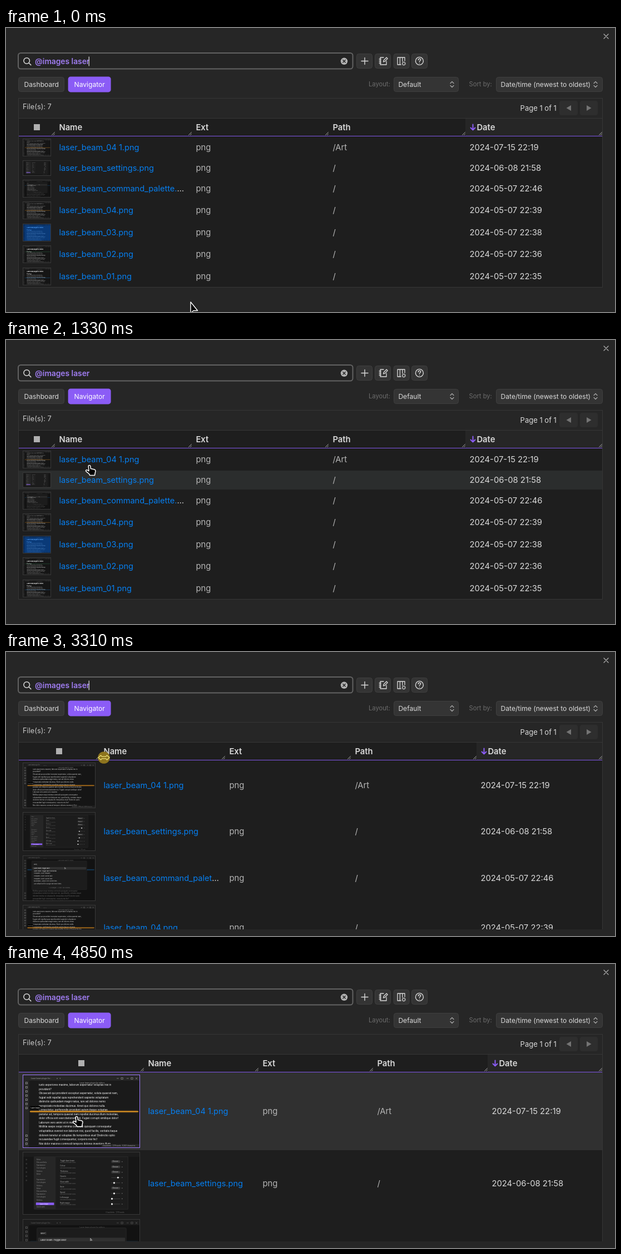
These frames come from a looping animation (1095x511 px, 5190 ms). An HTML page:

```html
<!DOCTYPE html>
<html lang="en">
<head>
<meta charset="utf-8">
<title>File navigator</title>
<style>
  html, body { margin: 0; width: 100%; height: 100%; overflow: hidden; background: #262626; }
  body { position: relative; font-family: Inter, sans-serif; }
  #chrome, #pointer { position: absolute; left: 0; top: 0; width: 1095px; height: 511px; }
  svg text { white-space: pre; }
  #clip { position: absolute; left: 22px; top: 126px; width: 1051px; height: 373px; overflow: hidden; }
  #panel { box-sizing: border-box; width: 1051px; border: 1px solid #363636; background: #1e1e1e; }
  .bar { height: 35px; background: #262626; border-bottom: 1px solid #363636; }
  .line { display: grid; grid-template-columns: var(--w) repeat(4, minmax(0, 1fr)); align-items: center;
          font-size: 14.8px; line-height: 20px; }
  .head { box-sizing: border-box; height: 32.2px; border-bottom: 1px solid #7f56e8; color: #dadada; font-weight: 600; }
  .head > div { position: relative; height: 31px; line-height: 33px; padding-left: 7.4px; }
  .head > div:last-child { background: #262626; }
  .head i { position: absolute; left: calc(50% - 5.5px); top: 10px; width: 11px; height: 11px; background: #b0b0b0; }
  .head .grip { position: absolute; right: 0; bottom: 1px; width: 6px; height: 6px; }
  .head .sort { vertical-align: -1px; margin-left: 1px; }
  .row { padding: 3.75px 0; }
  .row.hover { background: #2b2d2d; }
  .row.peek { background: #303030; }
  .row > div { padding: 0 7.4px; overflow: hidden; white-space: nowrap; text-overflow: ellipsis; color: #b5b5b5; }
  .row > div:last-child { color: #dadada; }
  .row .name { color: #dadada; font-size: 14.55px; }
  .name span { color: #067ff0; }
  .thumb { display: block; box-sizing: border-box; margin-left: 7px; width: calc(var(--w) - 14px);
           border: 1px solid #383838; overflow: hidden; }
  .peek .thumb { border-color: #7d60c8; filter: brightness(1.25); }
</style>
</head>
<body>
<div id="clip"><div id="panel"></div></div>
<svg id="chrome" viewBox="0 0 1095 511" font-family="Inter, sans-serif"></svg>
<svg id="pointer" viewBox="0 0 1095 511">
  <g id="arrow"><path d="M1 0V20L6 15.5H13.5Z" fill="#000" stroke="#fff" stroke-width="1.4" stroke-linejoin="round"/></g>
  <g id="hand"><path d="M-1.8 1.8Q-1.8 .4 0 .4Q1.6 .4 1.8 2L2.4 6.6L9 8Q11 8.6 11 10.6L10 15.5L9.4 18.6H.6L-.4 16L-6 11.4Q-7.2 9.8-5.6 8.9Q-4.2 8.3-1 10.8Z" fill="#000" stroke="#fff" stroke-width="1.5" stroke-linejoin="round"/></g>
  <g id="resize">
    <circle id="disc" r="10.8"/>
    <path id="bone" d="M-10 0L-5.5-4L-3.6-1.8H3.6L5.5-4L10 0L5.5 4L3.6 1.8H-3.6L-5.5 4Z" stroke-width="1.3" stroke-linejoin="round"/>
  </g>
</svg>
<script>
const $ = id => document.getElementById(id);
const rect = (x, y, w, h, fill, extra = '') => `<rect x="${x}" y="${y}" width="${w}" height="${h}" fill="${fill}" ${extra}/>`;
const text = (x, y, size, fill, str, extra = '') => `<text x="${x}" y="${y}" font-size="${size}" fill="${fill}" ${extra}>${str}</text>`;
const path = (d, stroke, width = 1.4) => `<path d="${d}" fill="none" stroke="${stroke}" stroke-width="${width}" stroke-linecap="round" stroke-linejoin="round"/>`;
const range = (n, f) => Array.from({ length: n }, (_, i) => f(i)).join('');

// Toolbar, search box and selects
const button = (x, y, w, h, fill = '#343434') => rect(x + .5, y + .5, w - 1, h - 1, fill, 'rx="4" stroke="#3f3f3f"');
const chevrons = (x, y) => path(`M${x - 3} ${y - 2}l3-3l3 3M${x - 3} ${y + 2}l3 3l3-3`, '#aaa', 1.2);
const ink = '#dadada';
$('chrome').innerHTML =
  path('M1075 11l8 8M1083 11l-8 8', '#b0b0b0', 1.2) +
  rect(22, 45, 601.5, 28.5, '#242424', 'rx="4.5" stroke="#626262" stroke-width="2"') +
  '<circle cx="37.2" cy="59" r="5.3" fill="none" stroke="#dadada" stroke-width="1.5"/>' + path('M41.2 63l3.6 3.6', ink, 1.5) +
  text(52, 64.6, 13.8, '#a07df2', '@images laser', 'font-weight="600"') +
  '<rect id="caret" x="148.6" y="51.5" width="1.2" height="17" fill="#e4e4e4"/>' +
  '<circle cx="608" cy="59.8" r="6.2" fill="#b3b3b3"/>' + path('M605.8 57.6l4.4 4.4M610.2 57.6l-4.4 4.4', '#262626') +
  [630, 663, 696.5, 729].map(x => button(x, 46, 29, 27)).join('') +
  path('M639 59.5h12M645 53.5v12', ink) +
  path('M679 53h-6v13h11v-6M671 56h3.5M671 59.5h3.5M671 63h3.5M678.5 61l.6-2.8l5-5.2l2 2l-5 5.2z', ink, 1.3) +
  path('M710 66h-6v-13h13v6M708.4 53v13M712.8 53v7', ink, 1.3) +
  '<circle cx="715.2" cy="64" r="2.6" fill="none" stroke="#dadada" stroke-width="1.8" stroke-dasharray="1.4 .6"/>' +
  '<circle cx="743.4" cy="59.4" r="7" fill="none" stroke="#dadada" stroke-width="1.4"/>' +
  path('M741.2 57.5q.2-2.2 2.3-2.2q2.2 0 2.2 2q0 1.5-2.3 2.4v.7M743.4 63v.1', ink) +
  button(22, 88, 83, 27) + text(32.6, 105.8, 12.1, ink, 'Dashboard') +
  rect(111.6, 87.4, 77, 28, '#8b5cf6', 'rx="4.5"') + text(122.6, 105.8, 12.1, '#fff', 'Navigator') +
  text(652, 105.4, 11.2, '#6c6c6c', 'Layout:') +
  button(697, 88, 117, 27) + text(705.4, 105.8, 12.1, ink, 'Default') + chevrons(802, 101.5) +
  text(832.6, 105.4, 11.2, '#6c6c6c', 'Sort by:') +
  button(881, 88, 192, 27) + text(889.6, 105.8, 12.1, ink, 'Date/time (newest to oldest)') + chevrons(1060, 101.5) +
  text(30, 146.2, 12.8, '#c8c8c8', 'File(s): 7') + text(924.6, 148.6, 13, ink, 'Page 1 of 1') +
  rect(995, 131, 33, 26, '#2e2e2e', 'rx="4"') + rect(1032, 131, 32, 26, '#2e2e2e', 'rx="4"') +
  '<path d="M1016 139v10l-8.5-5zM1044 139v10l8.5-5z" fill="#747474"/>';

// Preview pictures, 211 units wide
const prose = [
  'iusto asperiores maxime, laborum aspernatur voluptas nisi in', 'provident?',
  'Obcaecati qui provident excepturi aspernatur, soluta quaerat nam,',
  'fugiat velit repellat quia reprehenderit sapiente voluptatum',
  'distinctio quibusdam magni natus, iure ad dolores nemo',
  'perspiciatis molestiae ducimus. Amet quo dolores nulla.',
  'Consectetur, perferendis provident autem itaque voluptas',
  'pariatur ad, tempora quaerat nam repellat ducimus illum molestiae,',
  'dolor officia sint exercitationem est. Fugiat corrupti similique dolor!',
  'Laborum vero animi ut in maxime.',
  'Mollitia saepe sequi minima commodi quisquam consequatur',
  'voluptatibus eveniet non laborum nisi, quod facilis, veritatis itaque',
  'dolorem tenetur ut voluptas illo temporibus eius! Distinctio optio',
  'recusandae fugit consequuntur, corporis nisi hic!',
  'Nisi dolor maiores commodi tempore dolores inventore illum'];
const svg = (h, body) => `<svg class="thumb" viewBox="0 0 211 ${h}" preserveAspectRatio="none" style="aspect-ratio:211/${h}">${body}</svg>`;
const beam = (y, color) => rect(12, y - 2.4, 197, 4.8, color, 'opacity=".18" rx="2.4"') + rect(12, y - .7, 197, 1.4, color, 'rx=".7"');

function frame(bg, bar, dim) {
  return rect(0, 0, 211, 132, bg) + rect(0, 0, 211, 10, bar) + rect(0, 10, 10.5, 122, bar) +
    text(14, 7.2, 3.4, dim, 'Laser beam plugin for…') + text(60, 7.5, 4.5, dim, '×  +') +
    path('M170 6h3M178 4.5h3v3h-3zM188 6h3M196 4.5h3v3h-3zM204 4.5l3 3m0-3l-3 3', dim, .6) +
    text(125, 14.8, 3.3, dim, 'Laser beam plugin for editors', 'text-anchor="middle"') +
    range(7, i => rect(4.5, 13 + i * 7.6, 3, 3, 'none', `stroke="${dim}" stroke-width=".7"`)) +
    range(3, i => rect(4.5, 109 + i * 7.4, 3, 3, 'none', `stroke="${dim}" stroke-width=".7"`));
}

function note({ bg = '#151515', bar = '#1f1f1f', ink = '#d0d0d0', dim = '#858585', from = 0, title, glow, at }) {
  return svg(132, frame(bg, bar, dim) +
    (title ? text(28, 31, 9, title, 'Laser beam plugin for editors', 'font-weight="700"') +
             text(28, 47, 8, title, 'Headings', 'font-weight="700"') : '') +
    prose.map((s, i) => i < from ? '' : text(28.4, 19.4 + i * 7.65, 4.6, ink, s)).join('') +
    (glow ? beam(at, glow) : '') +
    (title ? '' : rect(12, 56.5, 19, 6, '#000', 'rx="1"') + text(13.5, 61, 3, '#ddd', 'Laser beam')) +
    rect(142, 126, 69, 6, bar) + text(144, 130.2, 2.9, dim, '0 backlinks   1,179 words   8,003 characters'));
}

function settings() {
  const knobs = [0, 0, 0, 172, 165, 0, 165, 161, 161];
  return svg(112.7, rect(0, 0, 211, 113, '#161616') + rect(0, 0, 211, 8, '#1c1c1c') +
    range(6, i => rect(4.5, 12 + i * 7.6, 2.5, 2.5, '#333')) +
    rect(20, 8, 170, 96, '#1c1c1c', 'stroke="#303030" stroke-width=".7"') + rect(20, 8, 39, 96, '#262626') +
    range(16, i => i === 6 ? '' : text(24, 14 + i * 5.3, 2.8, '#8c8c8c', ['Editor', 'Files and links', 'Appearance', 'Core plugins', 'Hotkeys'][i % 5])) +
    rect(23, 92, 33, 4.5, '#8b5cf6') + text(30, 95.4, 2.8, '#fff', 'Laser beam') + text(24, 101, 2.8, '#8c8c8c', 'Quick open') +
    knobs.map((k, i) => {
      const y = 16 + i * 9.7;
      return text(67, y, 3, '#b4b4b4', ['Toggle laser beam', 'Colour', 'Thickness', 'Opacity', 'Glow width', 'Style', 'Speed', 'Left margin', 'Right margin'][i]) +
        text(67, y + 3.6, 2.5, '#6a6a6a', 'Set how the beam looks') +
        (k ? rect(160, y + .6, 16, .8, '#444') + `<circle cx="${k}" cy="${y + 1}" r="1.6" fill="#eee"/>`
           : rect(160, y - 1.5, 16, 4.6, '#3a3a3a', 'rx="1"') + text(162, y + 1.7, 2.8, '#ccc', 'Choose')) +
        `<circle cx="179.5" cy="${y + 1}" r=".8" fill="#777"/>`;
    }).join('') + text(150, 111, 2.9, '#666', '0 backlinks   1,179 words'));
}

function palette() {
  const items = ['Laser beam: Toggle laser', 'Laser beam: Toggle laser horizontal', 'Templates: Insert template', 'Templates: Insert current date',
    'Templates: Insert current time', 'Bookmarks: Jump to the current item', 'Use default text for a plugin with more items'];
  return svg(132, frame('#121212', '#1d1d1d', '#666') +
    range(5, i => text(28, 105.5 + i * 7.6, 4.6, '#686868', prose[10 + i])) + beam(41, '#15568c') +
    rect(25, 15, 162, 85, '#1c1c1c', 'rx="2" stroke="#2e2e2e" stroke-width=".7"') +
    text(31, 26.5, 4, '#ccc', 'laser|') + rect(27, 33, 158, 7.4, '#303030', 'rx="1"') +
    items.map((s, i) => text(31, 38.2 + i * 7.7, 3.9, '#c8c8c8', s, i < 2 ? 'font-weight="600"' : '')).join('') +
    text(106, 96, 3.2, '#777', '↑↓ to navigate   ↵ to use   esc to dismiss', 'text-anchor="middle"') +
    path('M122 34.5v4l1-.8h1.6z', '#fff', .6));
}

// Table
const amber = { glow: '#dc8a1c', at: 66.5 };
const files = [
  ['04 1', '07-15 22:19', note(amber), '/Art'],
  ['settings', '06-08 21:58', settings()],
  ['command_palette', '05-07 22:46', palette()],
  ['04', '05-07 22:39', note(amber)],
  ['03', '05-07 22:38', note({ bg: '#0a3a78', bar: '#0a2a55', ink: '#5f94d0', dim: '#3c78c0', title: '#55a5ff', from: 5 })],
  ['02', '05-07 22:36', note({ title: '#fff', from: 5, glow: '#2c6b45', at: 48 })],
  ['01', '05-07 22:35', note({ title: '#fff', from: 5, glow: '#1c70b8', at: 77 })]];
const grip = `<svg class="grip" viewBox="0 0 6 6">${path('M.5 5.5l5-5M3.5 5.5l2-2', '#b8b8b8', .9)}</svg>`;
const sort = `<svg class="sort" width="12" height="13" viewBox="0 0 12 13">${path('M5.5 1.5v10M1.5 7.5l4 4l4-4', '#8b5cf6', 2)}</svg>`;
$('panel').innerHTML = '<div class="bar"></div><div class="line head">' +
  ['<i></i>', 'Name', 'Ext', 'Path', sort + 'Date'].map(s => `<div>${s}${grip}</div>`).join('') + '</div>' +
  files.map(([name, date, pic, dir = '/']) => `<div class="line row">${pic}<div class="name"><span>laser_beam_${name}.png</span></div>` +
    `<div>png</div><div>${dir}</div><div>2024-${date}</div></div>`).join('');
const rows = [...document.querySelectorAll('.row')];

const moves = [[0, 331, 493], [1, 326, 487], [5, 240, 345], [6, 206, 270], [8, 150, 225], [9, 112, 193], [10, 88, 191],
  [11, 88, 191], [12, 86.5, 189.5], [16, 86.5, 189.5], [20, 176, 190], [23, 227, 191], [25, 248, 191], [26, 248, 191],
  [28, 163, 262], [29, 127, 274]];
const widths = [[16, 65], [17, 72], [20, 145], [23, 190.5], [25, 220], [26, 225]];

function at(keys, tick) {
  const i = keys.findIndex(k => k[0] >= tick);
  if (i <= 0) return keys.at(i).slice(1);
  const [a, b] = [keys[i - 1], keys[i]], p = (tick - a[0]) / (b[0] - a[0]);
  return a.slice(1).map((v, j) => v + (b[j + 1] - v) * p);
}

const tickAt = t => t < 3520 ? Math.min(20, Math.floor(t / 164.8)) : Math.min(29, 21 + Math.floor((t - 3520) / 166));
const within = (v, a, b) => v >= a && v < b;

function draw(tick) {
  const [w] = at(widths, tick), [x, y] = at(moves, tick);
  $('panel').style.setProperty('--w', w + 'px');

  // The highlight trails the pointer by one step
  const [hx, hy] = at(moves, Math.max(0, tick - 1));
  for (const row of rows) {
    const box = row.getBoundingClientRect(), over = within(hy, box.top, box.bottom);
    row.classList.toggle('hover', over);
    row.classList.toggle('peek', over && hx < 23 + w && tick > 25);
  }

  const kind = tick < 6 ? 'arrow' : within(tick, 12, 27) ? 'resize' : 'hand';
  for (const id of ['arrow', 'hand', 'resize']) $(id).style.display = id === kind ? '' : 'none';
  $(kind).setAttribute('transform', `translate(${x} ${y})`);
  const held = within(tick, 15, 26), tint = tick < 18 ? '#8c8616' : '#8d741e';
  $('disc').setAttribute('fill', held ? tint : 'none');
  $('bone').setAttribute('fill', held ? tint : '#000');
  $('bone').setAttribute('stroke', held ? '#eee27a' : '#fff');

  const dark = [[2, 5], [8, 12], [15, 18], [29, 30]].some(([a, b]) => within(tick, a, b));
  $('caret').style.display = dark ? 'none' : '';
}

const start = performance.now();
let last = -1;
function loop() {
  const tick = tickAt((performance.now() - start) % 5190);
  if (tick !== last) draw(last = tick);
  requestAnimationFrame(loop);
}
loop();
</script>
</body>
</html>
```
